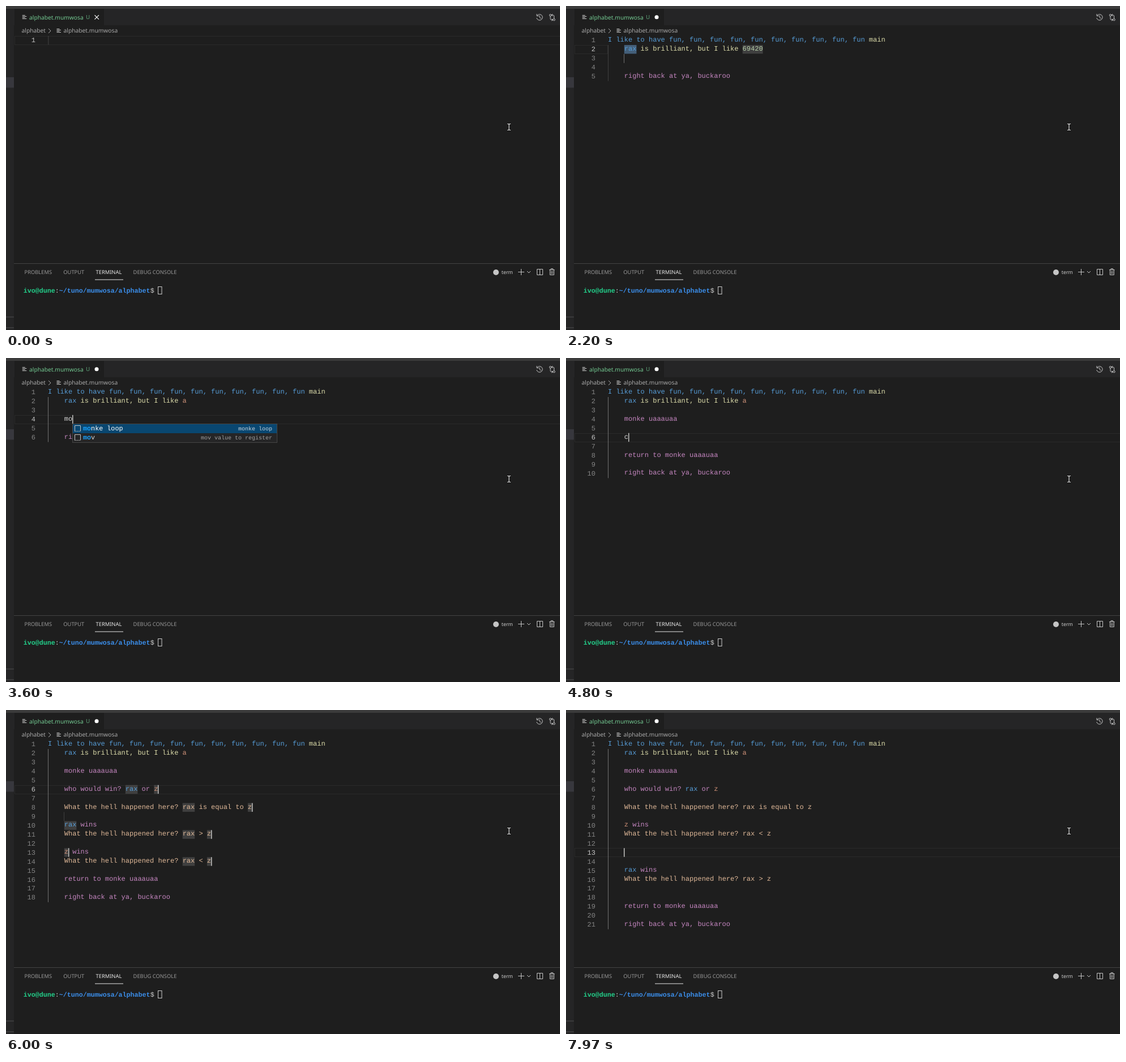
Recreate the animation shown at these times as an HTML page with a canvas. Size 978 px wide and 573 px high, loop 8 s.

```html
<!DOCTYPE html>
<html lang="en">
<head>
<meta charset="utf-8">
<title>Editor session</title>
<style>
html, body { margin: 0; width: 100%; height: 100%; overflow: hidden; background: #1e1e1e; }
canvas { display: block; width: 978px; height: 573px; }
</style>
</head>
<body>
<canvas id="stage"></canvas>
<script>
const W = 978, H = 573, LOOP = 8000;
const LEFT = 74, TOP = 53, CHAR = 7.2, ROW = 15.94;
const MONO = '"Liberation Mono", monospace', SANS = '"Noto Sans", sans-serif';
const BLUE = '#569cd6', YELLOW = '#dcdcaa', ORANGE = '#ce9178', NUMBER = '#b5cea8';
const PURPLE = '#c586c0', PEACH = '#dfb898', PLAIN = '#d4d4d4', ICON = '#c5c5c5';

const canvas = document.getElementById('stage');
const ctx = canvas.getContext('2d');
const ratio = window.devicePixelRatio || 1;
canvas.width = W * ratio;
canvas.height = H * ratio;
ctx.scale(ratio, ratio);
ctx.textRendering = 'geometricPrecision';

// Document states
const head = 'I like to have ' + Array(10).fill('fun').join(', ') + ' ';
const tail = 'right back at ya, buckaroo';
const set = 'rax is brilliant, but I like ';
const hell = 'What the hell happened here? ';
const inner = '    ';
const doc = (...body) => [head + 'main', ...body, '', tail];
const named = name => [head + name, '', '', tail];
const loop = (...body) =>
  doc(set + 'a', '', 'monke uaaauaa', '', ...body, '', 'return to monke uaaauaa');
const duel = (a, b, gap = '') => loop(
  `who would win? ${a} or ${b}`, '', `${hell}${a} is equal to ${b}`, gap,
  `${a} wins`, `${hell}${a} > ${b}`, '', `${b} wins`, `${hell}${a} < ${b}`);
const asked = ['who would win? rax or z', '', hell + 'rax is equal to z', ''];
const raxWins = ['rax wins', hell + 'rax > z', ''];
const cut = loop(...asked, ...raxWins);
const pasted = blanks =>
  loop(...asked, 'z wins', hell + 'rax < z', ...Array(blanks).fill(''), ...raxWins);
const settled = duel('rax', 'z');

// [start ms, lines, cursor line, cursor column or word, options]
const steps = [
  [0, [''], 1, 0, { alpha: 0.15 }],
  [30, ['f'], 1, 1],
  [110, ['f'], 1, 1, { query: 'f' }],
  [190, ['fu'], 1, 2, { query: 'fu' }],
  [270, ['fun'], 1, 3, { query: 'fun' }],
  [600, named(''), 1, 64],
  [680, named('m'), 1, 65],
  [760, named('ma'), 1, 66],
  [830, named('mai'), 1, 67],
  [910, named('main'), 1, 68],
  [1040, doc(''), 2, 4],
  [1370, doc('r'), 2, 5],
  [1430, doc('r'), 2, 5, { query: 'r' }],
  [1640, doc('re'), 2, 6, { query: 're' }],
  [1700, doc('reg'), 2, 7, { query: 'reg' }],
  [1950, doc(set + '69420', inner), 2, 'rax', { select: 'rax', marks: ['rax', '69420'], alpha: 0 }],
  [2270, doc(set + '69420', inner), 2, '69420', { select: '69420', marks: ['rax', '69420'] }],
  [2500, doc(set + 'a', inner), 2, 'a', { marks: ['rax', 'a'] }],
  [2560, doc(set + 'a', inner), 2, 'a', { marks: ['rax', 'a'], query: 'a' }],
  [2780, doc(set + 'a', inner), 2, 'a'],
  [2900, doc(set + 'a', inner), 3, 8],
  [3040, doc(set + 'a', ''), 3, 4],
  [3160, doc(set + 'a', '', ''), 4, 4],
  [3450, doc(set + 'a', '', 'm'), 4, 5],
  [3510, doc(set + 'a', '', 'm'), 4, 5, { query: 'm' }],
  [3570, doc(set + 'a', '', 'mo'), 4, 6, { query: 'mo' }],
  [3690, loop(''), 6, 4],
  [3800, loop('re'), 6, 6],
  [3860, loop('regis'), 6, 9, { query: 'regis' }],
  [4090, loop(''), 6, 4],
  [4270, loop(''), 6, 4, { alpha: 0 }],
  [4390, loop(''), 6, 4],
  [4510, loop(''), 6, 4, { alpha: 0 }],
  [4630, loop(''), 6, 4],
  [4770, loop('c'), 6, 5],
  [4810, loop('com'), 6, 7, { query: 'com' }],
  [4990, duel('eax', 'ebx', inner), 6, 'eax', { select: 'eax', marks: ['eax', 'ebx'] }],
  [5290, duel('r', 'ebx', inner), 6, 'r', { marks: ['r', 'ebx'] }],
  [5340, duel('r', 'ebx', inner), 6, 'r', { marks: ['r', 'ebx'], query: 'r' }],
  [5430, duel('ra', 'ebx', inner), 6, 'ra', { marks: ['ra', 'ebx'], query: 'ra' }],
  [5480, duel('rax', 'ebx', inner), 6, 'rax', { marks: ['rax', 'ebx'], query: 'rax' }],
  [5600, duel('rax', 'ebx', inner), 6, 'ebx', { select: 'ebx', marks: ['rax', 'ebx'] }],
  [5720, duel('rax', 'z', inner), 6, 'z', { marks: ['rax', 'z'] }],
  [5770, duel('rax', 'z', inner), 6, 'z', { marks: ['rax', 'z'], query: 'z' }],
  [5980, duel('rax', 'z', inner), 6, 'z', { marks: ['rax', 'z'] }],
  [6200, duel('rax', 'z', inner), 9, 8],
  [6430, settled, 9, 4],
  [6500, settled, 11, 4],
  [6570, settled, 13, 4],
  [6640, settled, 15, 4],
  [6700, settled, 15, 0],
  [6760, settled, 14, 0, { rows: [14, 14] }],
  [6870, settled, 13, 0, { rows: [13, 14] }],
  [7000, cut, 13, 0],
  [7070, cut, 12, 4],
  [7130, cut, 10, 4],
  [7190, cut, 9, 4],
  [7270, cut, 10, 4],
  [7350, pasted(0), 12, 4],
  [7480, pasted(1), 12, 4],
  [7600, pasted(2), 12, 4],
  [7720, pasted(3), 12, 4],
  [7850, pasted(3), 13, 4],
];

const commands = [
  'function|function', 'return 0|return 0', 'return 1|return 1', 'return from function|return',
  'right back at ya, buckaroo|return', 'set register|mov value to register',
  'Compare registers|who would win', 'jump to random line|random jump',
  'bit shift right|shift-right', 'zero/clear register|zero register',
  'negate register|flip the sign', 'monke loop|monke loop', 'mov|mov value to register',
  'add|add', 'add one|increment', 'and|bitwise and', 'align|align', 'allocate|heap',
  'ascii|character', 'assign|assign', 'await|wait',
].map(entry => entry.split('|'));

// Drawing helpers
function rect(x, y, w, h, color) {
  ctx.fillStyle = color;
  ctx.fillRect(x, y, w, h);
}
function text(str, x, y, color, font, align = 'left') {
  ctx.font = font;
  ctx.textAlign = align;
  ctx.fillStyle = color;
  ctx.fillText(str, x, y);
}
function line(path, color, width = 1) {
  ctx.strokeStyle = color;
  ctx.lineWidth = width;
  ctx.stroke(new Path2D(path));
}
function disc(x, y, r, color) {
  ctx.fillStyle = color;
  ctx.beginPath();
  ctx.arc(x, y, r, 0, 7);
  ctx.fill();
}

const indent = (str, row) => (row && str ? inner : '') + str;
const rowTop = row => TOP + ROW * row;
const colX = col => LEFT + CHAR * col;

function find(lines, word, from) {
  return lines.slice(from).flatMap((str, i) =>
    [...indent(str, from + i).matchAll(new RegExp(`\\b${word}\\b`, 'g'))]
      .map(m => ({ row: from + i, col: m.index })));
}

function drawCode(str, row) {
  const y = Math.round(rowTop(row) + 10.03), font = '12px ' + MONO;
  const put = (part, col, color) => text(part, colX(col), y, color, font);
  if (/^\s*\w*$/.test(str)) return put(str, 0, PLAIN);
  if (str.includes(hell)) return put(str, 0, PEACH);
  const rule = /(I like to have .*fun)|(\bma?i?n?$|is brilliant.*like)|\b([re]ax|ebx)\b|\b([a-z])\b|(69420)|(\S+)/g;
  const colors = [BLUE, YELLOW, BLUE, ORANGE, NUMBER, PURPLE];
  for (const m of str.matchAll(rule)) {
    put(m[0], m.index, colors[m.slice(1).findIndex(Boolean)]);
  }
}

function suggestions(lines, row, query) {
  const others = lines.filter((_, i) => i !== row).join(' ').match(/\w+/g) || [];
  const words = [...new Set(others)].sort()
    .filter(w => w.startsWith(query) && (w.length > 2 || w === 'at'));
  const match = new RegExp('\\b' + query, 'i');
  return [...words.map(w => [w]), ...commands.filter(c => match.test(c[0]))];
}

function drawPopup(lines, row, col, query) {
  const all = suggestions(lines, row, query), items = all.slice(0, 12);
  if (!items.length) return;
  const x = Math.round(colX(col)) + 1, y = Math.round(rowTop(row + 1));
  const w = 361, h = Math.round(items.length * ROW + 2.5);
  rect(x - 1, y - 1, w + 1, h, '#454545');
  rect(x, y, w - 1, h - 2, '#252526');
  rect(x, y, w - 1, 16, '#094771');
  items.forEach(([label, detail], i) => {
    const base = Math.round(rowTop(row + 1 + i) + 10.8);
    if (detail) {
      const bottom = base + 1.5;
      line(`M${x + 3.5} ${bottom}v-10h10v10`, ICON);
      ctx.setLineDash([1.5, 1]);
      line(`M${x + 3.5} ${bottom}h10`, ICON);
      ctx.setLineDash([]);
      text(detail, x + w - 9, base, i ? '#a0a0a0' : '#c8d4de', '10px ' + MONO, 'right');
    } else {
      text('abc', x + 2, base, '#d0d0d0', '600 7.5px ' + SANS);
    }
    const size = '11.75px ' + MONO, step = 11.75 * 0.6;
    const at = label.search(new RegExp('\\b' + query, 'i')), end = at + query.length;
    const color = i ? '#d4d4d4' : '#fff';
    text(label.slice(0, at), x + 18, base, color, size);
    text(label.slice(at, end), x + 18 + at * step, base, '#18a3ff', 'bold ' + size);
    text(label.slice(end), x + 18 + end * step, base, color, size);
  });
  if (all.length > 12) {
    rect(x + w - 9, y, 8, (h - 2) * 12 / all.length, 'rgba(121,121,121,.45)');
  }
}

function drawEditor([, lines, number, at, options = {}]) {
  const { select, marks = [], rows, query, alpha = 1 } = options;
  const current = number - 1;

  const lineEnd = select || rows ? 73 : W + 2;
  ctx.strokeStyle = '#2a2a2a';
  ctx.lineWidth = 1;
  ctx.strokeRect(15.5, Math.round(rowTop(current)) + 0.5, lineEnd - 15, 15);

  if (rows) {
    for (let row = rows[0] - 1; row < rows[1]; row++) {
      const length = indent(lines[row], row).length + 1;
      rect(LEFT, rowTop(row), length * CHAR, ROW, '#264f78');
    }
  }
  const shade = (word, color) => find(lines, word, current).forEach(p =>
    rect(colX(p.col), rowTop(p.row), word.length * CHAR, ROW - 0.5, color));
  if (select) shade(select, '#264f78');
  marks.forEach(word => shade(word, 'rgba(124,124,124,.35)'));

  const deep = [lines[current], lines[number]].includes(inner);
  if (lines.length > 1) {
    rect(LEFT, rowTop(1), 1, ROW * (lines.length - 1), at === 0 || deep ? '#404040' : '#707070');
  }
  lines.forEach((str, row) => {
    if (str === inner) rect(102, rowTop(row), 1, ROW, deep ? '#707070' : '#404040');
    text(row + 1, 52, Math.round(rowTop(row) + 11.43),
      row === current ? '#c6c6c6' : '#858585', '12px ' + MONO, 'right');
    drawCode(indent(str, row), row);
  });

  const cursors = typeof at === 'number'
    ? [{ row: current, col: at }]
    : find(lines, at, current).map(p => ({ row: p.row, col: p.col + at.length }));
  ctx.globalAlpha = alpha;
  cursors.forEach(p => rect(Math.floor(colX(p.col)), rowTop(p.row), 1.5, ROW - 0.5, '#c4c4c2'));
  ctx.globalAlpha = 1;
  if (query) drawPopup(lines, current, cursors[0].col, query);
}

function drawFileIcon(x, y) {
  line(`M${x} ${y}h5M${x} ${y + 2}h7.5M${x} ${y + 4}h5M${x} ${y + 6}h7.5`, ICON);
}

function drawFrame(saved) {
  const ui = '10.25px ' + SANS;
  rect(0, 0, W, H, '#1e1e1e');
  rect(0, 0, 14, H, '#252526');
  rect(14, 5, W - 14, 29, '#252526');
  rect(15, 5, 158, 29, '#1e1e1e');
  rect(0, 0, W, 5, '#3b3b3b');
  rect(0, 126, 14, 18.5, '#37373d');
  rect(0, 549.5, 14, 1, '#505050');
  rect(0, 568.5, 14, 1, '#505050');

  drawFileIcon(28.8, 16.5);
  text('alphabet.mumwosa', 41, 23.6, '#73c991', ui);
  text('U', 141, 23.4, '#5fa379', '9.8px ' + SANS);
  if (saved) line('M156.5 16.2l7.4 7.4m0-7.4l-7.4 7.4', '#fff', 1.2);
  else disc(160, 19.8, 3.5, '#fff');
  line('M937.6 17a5.2 5.2 0 1 1-.8 4M937 14v3.6h3.6M942 16.8v3.6l2.8 1.6', ICON);
  line('M961 18v4.5q0 2 2 2h2.5M963.5 22.5l2 2-2 2M967.5 22.5v-4.5q0-2-2-2h-2.2M965 14l-2 2 2 2', ICON);
  line('M959.3 16.3a1.7 1.7 0 1 0 3.4 0a1.7 1.7 0 1 0-3.4 0M965.8 24.2a1.7 1.7 0 1 0 3.4 0a1.7 1.7 0 1 0-3.4 0', ICON);

  text('alphabet', 27.5, 47.4, '#a9a9a9', ui);
  line('M75 40l4 4-4 4', '#a9a9a9');
  drawFileIcon(89.5, 40.5);
  text('alphabet.mumwosa', 101.5, 47.4, '#a9a9a9', ui);
}

function drawPanel() {
  const tab = '9.35px ' + SANS, shell = 'bold 11.67px ' + MONO;
  rect(14, 455, W - 14, 1, '#444');
  text('PROBLEMS', 32.5, 474, '#979797', tab);
  text('OUTPUT', 101.3, 474, '#979797', tab);
  text('TERMINAL', 158.5, 474, '#e7e7e7', tab);
  text('DEBUG CONSOLE', 224.6, 474, '#979797', tab);
  rect(157, 483.5, 50, 1, '#e7e7e7');

  disc(865, 471, 5, ICON);
  text('term', 874.7, 474, '#ccc', '8.9px ' + SANS);
  line('M904 470.5h11M909.5 465v11M920 469l3 3 3-3', ICON);
  line('M937.5 465.5h10v10h-10zM942.5 465.5v10', ICON);
  line('M959 466.5h9.5M962 466v-1.5h3.5v1.5M960.3 467v8.5h7v-8.5M962.6 468.5v5.5M965 468.5v5.5', ICON);

  text('ivo@dune', 30.7, 507, '#23d18b', shell);
  text(':', 86.7, 507, '#ccc', '11.67px ' + MONO);
  text('~/tuno/mumwosa/alphabet', 93.7, 507, '#3b8eea', shell);
  text('$', 254.7, 507, '#ccc', '11.67px ' + MONO);
  ctx.lineWidth = 1;
  ctx.strokeStyle = '#ccc';
  ctx.strokeRect(268.5, 496.5, 6.5, 13);
}

function drawPointer() {
  const beam = 'M885 208.5h2l1 1 1-1h2M888 209.5v9M885 219.5h2l1-1 1 1h2';
  line(beam, '#111', 2.6);
  line(beam, '#e8e8e8', 1.2);
}

const start = performance.now();
function render() {
  const t = (performance.now() - start) % LOOP;
  drawFrame(t < 30);
  drawPanel();
  drawEditor(steps.findLast(step => step[0] <= t) || steps[0]);
  drawPointer();
  requestAnimationFrame(render);
}
render();
</script>
</body>
</html>
```
